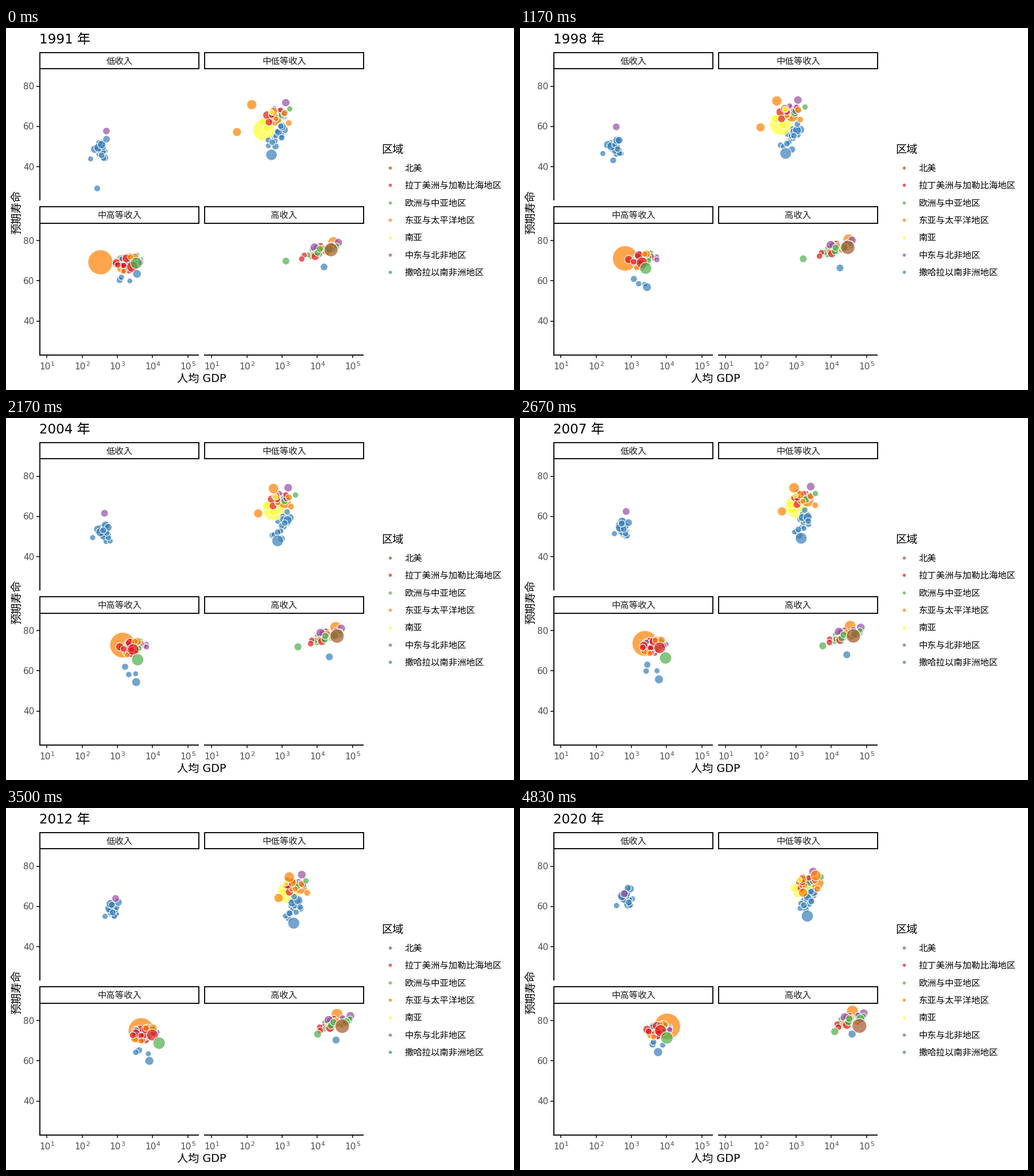
Animation, 885 px wide and 632 px high, one loop 5000 ms. Source, as a matplotlib script:

```python
import numpy as np
import matplotlib.pyplot as plt
from matplotlib.animation import FuncAnimation
from matplotlib.colors import to_rgba
from matplotlib.patches import Rectangle

W, H, DPI = 885, 632, 100
FIRST, YEARS = 1991, 30
FRAMES, INTERVAL = 200, 25       # 5 s per loop
BASE = 19.2                      # base text height in px
SMALL = BASE * 0.8
ALPHA = 0.7
DECADE, YEAR_PX = 61.35, 3.515   # px per power of ten, px per year of life
TICK, INK = "#333333", "#4D4D4D"

plt.rcParams["font.family"] = ["DejaVu Sans", "Noto Sans CJK JP"]

# colour, name, then shift of log GDP, shift of life and mid-period dip in life
REGIONS = {
    "n": ("#A65628", "北美", 0, 0, 0),
    "r": ("#E41A1C", "拉丁美洲与加勒比海地区", -0.08, 0, 0),
    "g": ("#4DAF4A", "欧洲与中亚地区", 0.03, 0, 0.5),
    "o": ("#FF7F00", "东亚与太平洋地区", 0, -0.5, 0),
    "y": ("#FFFF33", "南亚", -0.2, 0, 0),
    "p": ("#984EA3", "中东与北非地区", 0.08, 1, 0),
    "b": ("#377EB8", "撒哈拉以南非洲地区", 0, -10, 4.5),
}

# name, left, top, small countries per region, log GDP at start and end,
# life at start and end, cycle strength, spread of log GDP and of life
PANELS = [
    ("低收入", 59, 42, dict(b=20), 2.48, 2.83, 57.5, 72, 0.15, 0.14, 3),
    ("中低等收入", 346, 42, dict(r=6, g=5, o=7, y=4, p=6, b=16),
     2.9, 3.35, 65, 71.5, 0.2, 0.17, 2.8),
    ("中高等收入", 59, 311.5, dict(r=15, g=12, o=6, y=1, p=5, b=3),
     3.32, 3.8, 69, 75.5, 0.17, 0.16, 2.3),
    ("高收入", 346, 311.5, dict(r=8, g=22, o=6, p=6, b=1),
     4.08, 4.5, 75, 80.2, 0.12, 0.26, 1.3),
]

# Eye-catching countries: panel, region, radius, log GDP at start and end,
# cycle strength, life at start and end, dip
LANDMARKS = [
    (2, "o", 21.3, 2.52, 4.02, 0.1, 69.2, 77.1, 0),
    (1, "y", 18.6, 2.48, 3.28, 0.18, 58.2, 70.2, 0),
    (1, "o", 10.3, 2.81, 3.6, 0.2, 63.3, 71.6, 0),
    (3, "o", 9.3, 4.46, 4.6, 0, 79.1, 84.6, 0),
    (1, "o", 8.3, 2.14, 3.56, 0.05, 70.8, 75.4, -1),
    (1, "o", 7.2, 1.72, 3.2, 0.15, 57.2, 66.8, 0),
    (2, "r", 9.3, 3.43, 3.83, 0.38, 67, 75, 0),
    (0, "b", 5.3, 2.43, 2.9, 0.1, 29.2, 69.2, -6),
    (0, "p", 6, 2.69, 2.8, 0.25, 57.7, 66.3, 0),
    (1, "b", 9.4, 2.7, 3.32, 0.25, 45.9, 55.2, 2.2),
    (3, "g", 6.1, 3.11, 4.1, 0.25, 69.8, 74.5, 0),
    (2, "g", 9.8, 3.54, 4.01, 0.42, 68.8, 71.4, 4.5),
    (2, "b", 7, 3.56, 3.76, 0.28, 63.4, 64.3, 9.5),
    (3, "n", 11.6, 4.39, 4.8, 0.03, 75.4, 77.3, -1),
]


def crowd(rng):
    """Small countries scattered around the mean path of their panel."""
    found = []
    for i, (_, _, _, mix, g0, g1, l0, l1, swing, sg, sl) in enumerate(PANELS):
        for key, count in mix.items():
            dg, dl, dip = REGIONS[key][2:]
            for _ in range(count):
                rich, healthy = np.clip(rng.normal(size=2), -1.7, 1.7)
                rich = rich * sg + dg
                healthy = healthy * sl + 5 * rich + dl
                found.append((
                    i, key, 4.4 + 2.8 * rng.random() ** 1.8,
                    g0 + rich, g1 + 0.8 * rich + rng.normal(0, 0.05),
                    swing * rng.uniform(0.3, 1.7),
                    l0 + healthy, l1 + 0.85 * healthy, dip * rng.uniform(0.2, 1.8)))
    rng.shuffle(found)
    return found


def track(bubble):
    """Yearly stage position: steady growth, a business cycle and a dip in life."""
    panel, _, _, g0, g1, swing, l0, l1, dip = bubble
    _, left, top, *_ = PANELS[panel]
    t = np.linspace(0, 1, YEARS)
    cycle = np.sin(np.pi * t) * np.sin(2 * np.pi * (29 * t - 14.5) / 22)
    gdp = g0 + (g1 - g0) * t + swing * cycle
    life = l0 + (l1 - l0) * t - dip * np.sin(np.pi * t ** 0.8) ** 2
    return gdp_x(left, gdp), life_y(top, life)


def gdp_x(left, log_gdp):
    return left + 12.2 + (log_gdp - 1) * DECADE


def life_y(top, life):
    return top + 59.5 + (80 - life) * YEAR_PX


def pt(px):
    return px * 72 / DPI


def area(r):
    return pt(2 * (np.asarray(r) + 0.4)) ** 2


def dots(x, y, r, keys):
    fills = [to_rgba(REGIONS[k][0], ALPHA) for k in keys]
    return ax.scatter(x, y, s=area(r), c=fills, edgecolors="white",
                      linewidths=pt(1.13), zorder=3)


def label(x, y, text, size, color="black", **kw):
    return ax.text(x, y, text, fontsize=pt(size), color=color, va="baseline", **kw)


def line(xs, ys, color="black"):
    ax.plot(xs, ys, color=color, lw=pt(1.86), solid_capstyle="butt", zorder=2)


def draw_panel(name, left, top):
    ax.add_patch(Rectangle((left + 0.4, top + 0.9), 276.4, 28.4, fc="white",
                           ec="black", lw=pt(1.86), joinstyle="miter", zorder=2))
    label(left + 138.5, top + 20.6, name, SMALL, "#1A1A1A", ha="center")
    if left < 100:
        line((left - 0.2, left - 0.2), (top + 30, top + 259.2))
        for life in (80, 60, 40):
            y = life_y(top, life)
            line((left - 6, left - 1), (y, y), TICK)
            label(left - 9.5, y + 5.6, str(life), SMALL, INK, ha="right")
    if top > 100:
        base = top + 259.1
        line((left - 1, left + 277), (base, base))
        for power in range(1, 6):
            x = gdp_x(left, power)
            line((x, x), (base + 0.9, base + 5.4), TICK)
            label(x - 13.2, base + 24.9, "10", SMALL, INK)
            label(x + 6.4, base + 19.6, str(power), SMALL * 0.7, INK)


fig = plt.figure(figsize=(W / DPI, H / DPI), dpi=DPI, facecolor="white")
ax = fig.add_axes((0, 0, 1, 1))
ax.set(xlim=(0, W), ylim=(H, 0))
ax.axis("off")

for panel in PANELS:
    draw_panel(*panel[:3])
label(341, 618, "人均 GDP", BASE, ha="center")
label(24, 321.5, "预期寿命", BASE, ha="center", rotation=90, rotation_mode="anchor")

label(654.5, 218, "区域", BASE)
for i, key in enumerate(REGIONS):
    y = 244 + i * 30.4
    dots([669], [y], [3.0], [key])
    label(694.5, y + 5.7, REGIONS[key][1], SMALL)

small = crowd(np.random.default_rng(11))
bubbles = small[:30] + LANDMARKS[:4] + small[30:] + LANDMARKS[4:]
paths = np.array([track(b) for b in bubbles])
radii = np.array([b[2] for b in bubbles])

title = label(58.5, 27, "", BASE * 1.2)
cloud = dots(paths[:, 0, 0], paths[:, 1, 0], radii, [b[1] for b in bubbles])


def draw(n):
    i = (3 * n + 2) // 20        # one year every sixth of a second
    title.set_text(f"{FIRST + i} 年")
    cloud.set_offsets(paths[:, :, i])
    cloud.set_sizes(area(radii * (1 + 0.06 * i / (YEARS - 1))))
    return title, cloud


anim = FuncAnimation(fig, draw, frames=FRAMES, interval=INTERVAL,
                     repeat=True, repeat_delay=0)
plt.show()
```
